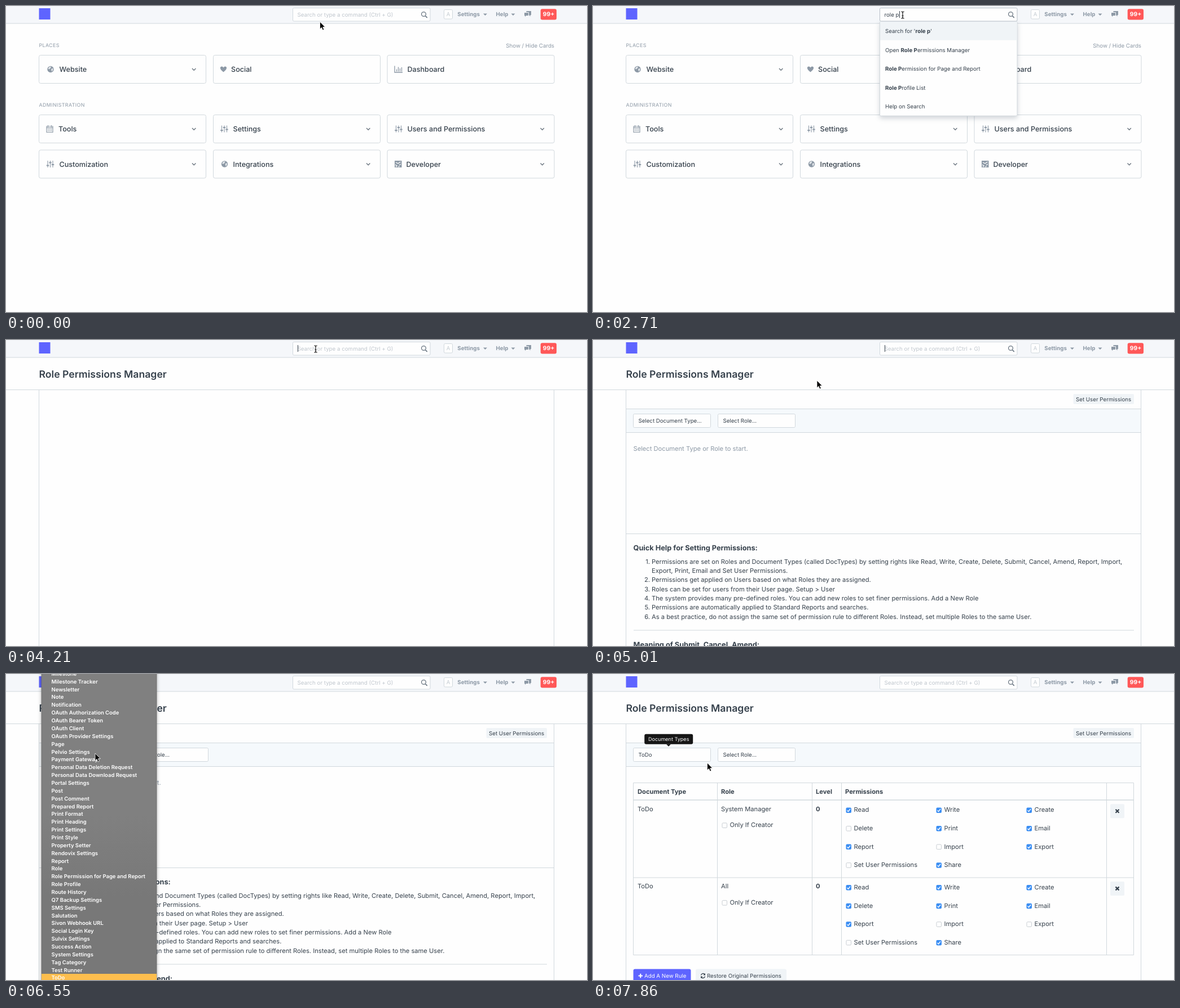
An HTML page that plays this animation: 1030x544 px, repeating every 8 s.

```html
<!DOCTYPE html>
<html lang="en">
<head>
<meta charset="utf-8">
<title>Role permissions</title>
<style>
html, body { margin: 0; width: 100%; height: 100%; overflow: hidden; background: #fefefe; }
svg { display: block; font-family: Inter, sans-serif; font-optical-sizing: none; text-rendering: geometricPrecision; }
.b { font-weight: 700; }
.s { font-weight: 600; }
.m { font-weight: 500; }
</style>
</head>
<body>
<svg id="stage" width="1030" height="544" viewBox="0 0 1030 544"></svg>
<script>
const LOOP = 8000, ROW = 13.86;
const INK = '#36414c', MUTED = '#8d99a6', LINE = '#d1d8dd', SMALL = 9.74, BODY = 11.16;
const stage = document.getElementById('stage');
const ruler = document.createElement('canvas').getContext('2d');
ruler.font = SMALL + 'px Inter, sans-serif';

// Drawing helpers: y of a text is the middle of its capitals.
const text = (x, y, s, size = BODY, fill = INK, more = '') =>
  `<text x="${x}" y="${y + size * .364}" font-size="${size}" fill="${fill}" ${more}>${s}</text>`;
const bold = (x, y, s, size = BODY) => text(x, y, s, size, INK, 'class="b"');
const box = (x, y, w, h, fill, stroke = 'none', r = 0, more = '') =>
  `<rect x="${x}" y="${y}" width="${w}" height="${h}" rx="${r}" fill="${fill}" stroke="${stroke}" ${more}/>`;
const fillPath = (d, fill) => `<path d="${d}" fill="${fill}"/>`;
const line = (d, stroke = LINE, w = 1) => `<path d="${d}" fill="none" stroke="${stroke}" stroke-width="${w}"/>`;
const at = (x, y, s) => `<g transform="translate(${x} ${y})">${s}</g>`;

const icons = {
  globe: `<circle r="5.7" fill="${MUTED}"/>` + fillPath('M-2-4.5L1-4.8L0-2L-2.5 0L-4.5-1ZM1-.5L4.5-2L4 2L2 4L1.5 1.5Z', '#e3e7eb'),
  heart: fillPath('M0 5C-8-1-6-5-3-5Q-1-5 0-3Q1-5 3-5C6-5 8-1 0 5Z', MUTED),
  chart: line('M-6.5-6V5.5H7.5M-3 4V0M0 4V-4M3 4V-1.5M6 4V-3.5', MUTED, 1.3),
  calendar: line('M-5.5-4.5H5.5V6H-5.5ZM-5.5-2H5.5M-3-6.5V-3M3-6.5V-3', MUTED, 1.2) +
    line('M-3.5 .5H4M-3.5 3.2H4', MUTED, 1.4).replace('/>', ' stroke-dasharray="1.6 1.2"/>'),
  sliders: line('M-4.5-6V6M0-6V6M4.5-6V6', MUTED, 1.1) + line('M-6.7 2.5H-2.3M-2.2-2.5H2.2M2.3 1H6.7', MUTED, 1.8),
  code: box(-6, -6, 12.5, 12, MUTED) + line('M-4-3L0-1L4.5-4M-5 1L-2 3L-4 5M2 2L5 0M0 5L3 4', '#fefefe', 1.3)
};

const card = (x, y, h, label, icon, iconX, textX, opens = true) =>
  box(x + .5, y + .5, 296, h, '#fefefe', LINE, 3) + at(iconX, y + 25.5, icons[icon]) +
  text(textX, y + 25.5, label, 12.6, INK, 'class="m"') +
  (opens ? line(`M${x + 272} ${y + 24}l3.2 3.2 3.2-3.2`, '#6c7680', 1.4) : '');

const caps = (y, s) => text(58.5, y, s, 8.8, MUTED, 'letter-spacing=".42"');
const home = caps(70, 'PLACES') + caps(176, 'ADMINISTRATION') +
  text(972, 70, 'Show / Hide Cards', SMALL, MUTED, 'text-anchor="end"') +
  card(58, 87, 50, 'Website', 'globe', 79, 94.5) +
  card(367, 87, 50, 'Social', 'heart', 385.5, 399, false) +
  card(675.5, 87, 50, 'Dashboard', 'chart', 695.5, 711.5, false) +
  card(58, 193, 50, 'Tools', 'calendar', 77.5, 93) +
  card(367, 193, 50, 'Settings', 'sliders', 387, 402.5) +
  card(675.5, 193, 50, 'Users and Permissions', 'sliders', 696, 711.5) +
  card(58, 255.5, 50, 'Customization', 'sliders', 78.5, 94.5) +
  card(367, 255.5, 50, 'Integrations', 'globe', 387.5, 402.5) +
  card(675.5, 255.5, 50, 'Developer', 'code', 695, 709.5);

const navbar = box(0, 0, 1030, 31, '#f5f7fa') + line('M0 31H1030') +
  box(58.5, 4, 20, 20, '#5e64ff') +
  box(776.5, 6.5, 15, 16.5, '#fefefe', LINE, 2) + text(784, 15, 'A', 9.6, '#c5ccd3', 'text-anchor="middle"') +
  text(800.3, 14.5, 'Settings', 9.8, MUTED, 'class="b"') +
  text(868.5, 14.5, 'Help', 9.8, MUTED, 'class="b"') +
  fillPath('M846 13.5h7l-3.5 3.5zM895.5 13.5h7l-3.5 3.5z', MUTED) +
  fillPath('M922.5 9h8.5v7h-1.5v2.5l-2.5-2.5h-4.5z', MUTED) +
  `<path d="M918.5 11.5h8v6h-4.5l-2.5 2.5v-2.5h-1z" fill="${MUTED}" stroke="#f5f7fa"/>` +
  box(947.7, 5.2, 28.3, 19.2, '#ff5858', 'none', 3) + text(962, 14.7, '99+', 10.3, '#fff', 'class="b" text-anchor="middle"');

const pageHead = text(58.5, 60.4, 'Role Permissions Manager', 17.65, INK, 'class="s"') +
  line('M0 88.5H1030M58.5 89V544M971.5 89V544');

const field = (x, s) => box(x + .5, 131.5, 137, 24, '#fefefe', LINE, 2) + text(x + 9.5, 143, s, 9.7);
const filters = type => box(851.5, 96, 107.5, 18, '#f0f4f7', 'none', 2) + text(856, 105, 'Set User Permissions', SMALL) +
  box(59, 123, 912, 41, '#f5f9fc') + line('M59 122.5H971M59 164.5H971') +
  field(71, type) + field(221, 'Select Role...');

const helpLines = [
  '1.Permissions are set on Roles and Document Types (called DocTypes) by setting rights like Read, Write, Create, Delete, Submit, Cancel, Amend, Report, Import,',
  'Export, Print, Email and Set User Permissions.',
  '2.Permissions get applied on Users based on what Roles they are assigned.',
  '3.Roles can be set for users from their User page. Setup &gt; User',
  '4.The system provides many pre-defined roles. You can add new roles to set finer permissions. Add a New Role',
  '5.Permissions are automatically applied to Standard Reports and searches.',
  '6.As a best practice, do not assign the same set of permission rule to different Roles. Instead, set multiple Roles to the same User.'
];
const help = text(71.5, 193, 'Select Document Type or Role to start.', BODY, MUTED) +
  line('M59 344.5H971M72 516H959') + bold(71.5, 369.5, 'Quick Help for Setting Permissions:', 12.75) +
  helpLines.map((s, i) => {
    const y = 393.7 + i * 16.3, [, number, body] = s.match(/^(\d\.)?(.*)/);
    return text(104, y, body) + (number ? text(101, y, number, BODY, INK, 'text-anchor="end"') : '');
  }).join('') + bold(71.5, 541, 'Meaning of Submit, Cancel, Amend:', 12.75);

const check = (x, y, s, on) =>
  (on ? box(x, y - 4, 9.5, 9.5, '#3b8ef3', 'none', 2) + line(`M${x + 2} ${y + 1}l2 2 3.6-4.5`, '#fff', 1.4)
      : box(x + .5, y - 3.5, 8.5, 8.5, '#fefefe', '#c9ced3', 1.5)) + text(x + 14, y, s);
const rights = ['Read', 'Write', 'Create', 'Delete', 'Print', 'Email', 'Report', 'Import', 'Export', 'Set User Permissions', 'Share'];
const rule = (y, role, off) => text(79, y, 'ToDo') + text(227, y, role) + bold(395, y, '0') +
  check(228.5, y + 28.7, 'Only If Creator', false) +
  rights.map((s, i) => check(448.5 + i % 3 * 160, y + 1.7 + Math.floor(i / 3) * 32.6, s, !off.includes(s))).join('') +
  box(917, y - 8.5, 25, 25, '#f0f4f7', 'none', 2) + line(`M926.5 ${y + 1}l6 6m0-6l-6 6`, INK, 2.2);
const table = line('M71.5 193.5H958.5V499.5H71.5ZM220.5 193V500M388.5 193V500M440.5 193V500M910.5 193V500M71 362H959') +
  line('M71 224H959', LINE, 1.7) +
  bold(79, 209, 'Document Type') + bold(227, 209, 'Role') + bold(395, 209, 'Level') + bold(447, 209, 'Permissions') +
  rule(239.7, 'System Manager', ['Delete', 'Import', 'Set User Permissions']) +
  rule(377.4, 'All', ['Import', 'Export', 'Set User Permissions']) +
  box(71.5, 524.5, 102, 24, '#5e64ff', 'none', 3) + line('M80.5 536.5h7.5m-3.75-3.75v7.5', '#fff', 2) +
  text(91, 536.5, 'Add A New Rule', SMALL, '#fff') +
  box(182, 524.5, 161, 24, '#f0f4f7', 'none', 3) + text(202, 536.5, 'Restore Original Permissions', SMALL) +
  line('M191.5 535.5a3.6 3.6 0 0 1 6.5-1.5m.5 3.5a3.6 3.6 0 0 1-6.5 1.5', INK, 1.4) +
  fillPath('M199 532v3.5h-3.5zM191 541v-3.5h3.5z', INK);

const tooltip = box(91.2, 106.8, 86, 18, '#161616', 'none', 3) + fillPath('M130 124.7h8l-4 4z', '#161616') +
  text(134.2, 115.8, 'Document Types', 9.05, '#fff', 'text-anchor="middle"');

const firstTypes = ('Select Document Type...|About Us Settings|Activity Log|Address|Address Template|Assignment Rule|' +
  'Auto Email Report|Auto Repeat|Blog Category|Blog Post|Blog Settings|Blogger|Bolvendar Settings|Bulk Update|' +
  'Calendar View|Chat Message|Chat Profile|Chat Room|Chat Token|Comment|Communication|Contact|Contact Us Settings|' +
  'Country|Currency|Custom DocPerm|Custom Field|Custom Role|Custom Script|Customize Form').split('|');
const lastTypes = ('Language|Letter Head|List Filter|Milestone|Milestone Tracker|Newsletter|Note|Notification|' +
  'OAuth Authorization Code|OAuth Bearer Token|OAuth Client|OAuth Provider Settings|Page|Pelvio Settings|' +
  'Payment Gateway|Personal Data Deletion Request|Personal Data Download Request|Portal Settings|Post|Post Comment|' +
  'Prepared Report|Print Format|Print Heading|Print Settings|Print Style|Property Setter|Rendovix Settings|Report|Role|' +
  'Role Permission for Page and Report|Role Profile|Route History|Q7 Backup Settings|SMS Settings|Salutation|' +
  'Sivon Webhook URL|Social Login Key|Sulvix Settings|Success Action|System Settings|Tag Category|Test Runner|ToDo').split('|');

const shade = '<linearGradient id="shade" x2="0" y2="1"><stop offset=".45" stop-color="#808080"/><stop offset=".7" stop-color="#787878"/></linearGradient>';
function popup(top, firstY, rows, selected, opacity) {
  return `<g opacity="${opacity}">` + shade +
    box(63, top, 204, 570 - top, 'url(#shade)', '#6a6a6a', 4, 'stroke-width=".8" style="filter:drop-shadow(0 1px 3px rgba(0,0,0,.3))"') +
    box(63, firstY + selected * ROW - 7, 204, 14, '#fdbe4e') +
    rows.map((s, i) => text(80.5, firstY + i * ROW, s, 9.47, '#fff', 'class="s"')).join('') +
    (top > 0 ? line('M68 143l2.3 2.5 4.5-6', '#fff', 1.4) : '') + '</g>';
}
function typePopup(t) {
  if (t < 5740 || t >= 7680) return '';
  if (t < 6400) return popup(131, 142.5, firstTypes, 0, 1);
  const rows = t < 6550 ? lastTypes.slice(0, -2) : lastTypes;
  const opacity = t < 7390 ? 1 : t < 7510 ? .78 : .3;
  return popup(-10, 540 - (rows.length - 1) * ROW, rows, rows.length - 1, opacity);
}

// Text in the search field over time.
const typing = [[1990, 'r'], [2110, 'ro'], [2230, 'rol'], [2350, 'role'], [2470, 'role '],
  [2710, 'role p'], [2825, 'role per'], [2940, 'role perm'], [3055, 'role permi'], [4010, '']];
const latest = (steps, t) => steps.filter(step => step[0] <= t).pop();

function suggestions(query) {
  if (!query) return ['Help on Search'];
  const found = query.length < 6 ? ['Role List', 'Role Profile List', 'New Role']
    : ['Open Role Permissions Manager', 'Role Permission for Page and Report'];
  if (query === 'role p') found.push('Role Profile List');
  const mark = s => s.replace(new RegExp(query.trim(), 'i'), '<tspan class="b">$&</tspan>');
  return [`Search for '<tspan class="b">${query}</tspan>'`, ...found.map(mark), 'Help on Search'];
}

function search(t) {
  const query = (latest(typing, t) || [0, ''])[1];
  const focused = t >= 680 && t < 4010;
  const caretOn = [[680, 1160], [1670, 3620], [4010, 4590], [5010, 5474]].some(([a, b]) => t >= a && t < b);
  const caretX = 517.5 + Math.round(ruler.measureText(query).width);
  let out = '';
  if (t >= 800 && t < 4010) {
    const items = suggestions(query), selected = t >= 3170 ? 1 : 0;
    out += box(508.5, 27, 243.5, items.length * 33.5 + .8, '#fefefe', LINE, 2, 'style="filter:drop-shadow(0 4px 4px rgba(30,50,70,.2))"') +
      box(509, 27.3 + selected * 33.5, 242.5, 33.5, '#f0f4f7') +
      items.map((s, i) => text(518, 44.5 + i * 33.5, s, SMALL)).join('');
  }
  return out + box(508.5, 3.5, 243.5, 23.5, '#fefefe', focused ? '#b5bdc6' : LINE, 2) +
    (query ? text(516.5, 15, query, SMALL) : text(516.5, 15, 'Search or type a command (Ctrl + G)', SMALL, '#c0c7ce')) +
    '<circle cx="740.5" cy="14.5" r="3.9" fill="none" stroke="#687480" stroke-width="1.3"/>' +
    line('M743.3 17.5l3.4 3.4', '#687480', 1.7) +
    (caretOn ? line(`M${caretX} 9V21`, INK) : '');
}

const pointer = '<path d="M0 0V13L3 10.3L5 15L7.3 14L5.3 9.5H9.3Z" fill="#000" stroke="#fff" stroke-width=".8"/>';
const beamPath = 'M-2.7-6Q0-6 0-4.5Q0-6 2.7-6M0-4.5V4.5M-2.7 6Q0 6 0 4.5Q0 6 2.7 6M-1.5 1.5H1.5';
const beam = line(beamPath, '#fff', 2.4) + line(beamPath, '#111', 1.2);
const moves = [[0, 556.5, 28], [110, 551.5, 20.5, beam], [320, 549, 16, beam], [5010, 397, 72], [5126, 296, 104],
  [5242, 212, 129], [5358, 170, 139], [5474, 158, 141], [7680, 188, 146], [7860, 202.5, 158]];
function cursor(t) {
  const [, x, y, shape = pointer] = latest(moves, t);
  return at(x, y, shape);
}

function scene(t) {
  let page = home;
  if (t >= 4210) page = pageHead;
  if (t >= 4410) page += filters(t < 7680 ? 'Select Document Type...' : 'ToDo') + (t < 7860 ? help : table);
  if (t >= 5590) page += tooltip;
  return page + navbar + search(t) + typePopup(t) + cursor(t);
}

let shown = '';
function tick() {
  const next = scene(performance.now() % LOOP);
  if (next !== shown) stage.innerHTML = shown = next;
  requestAnimationFrame(tick);
}
tick();
</script>
</body>
</html>
```
